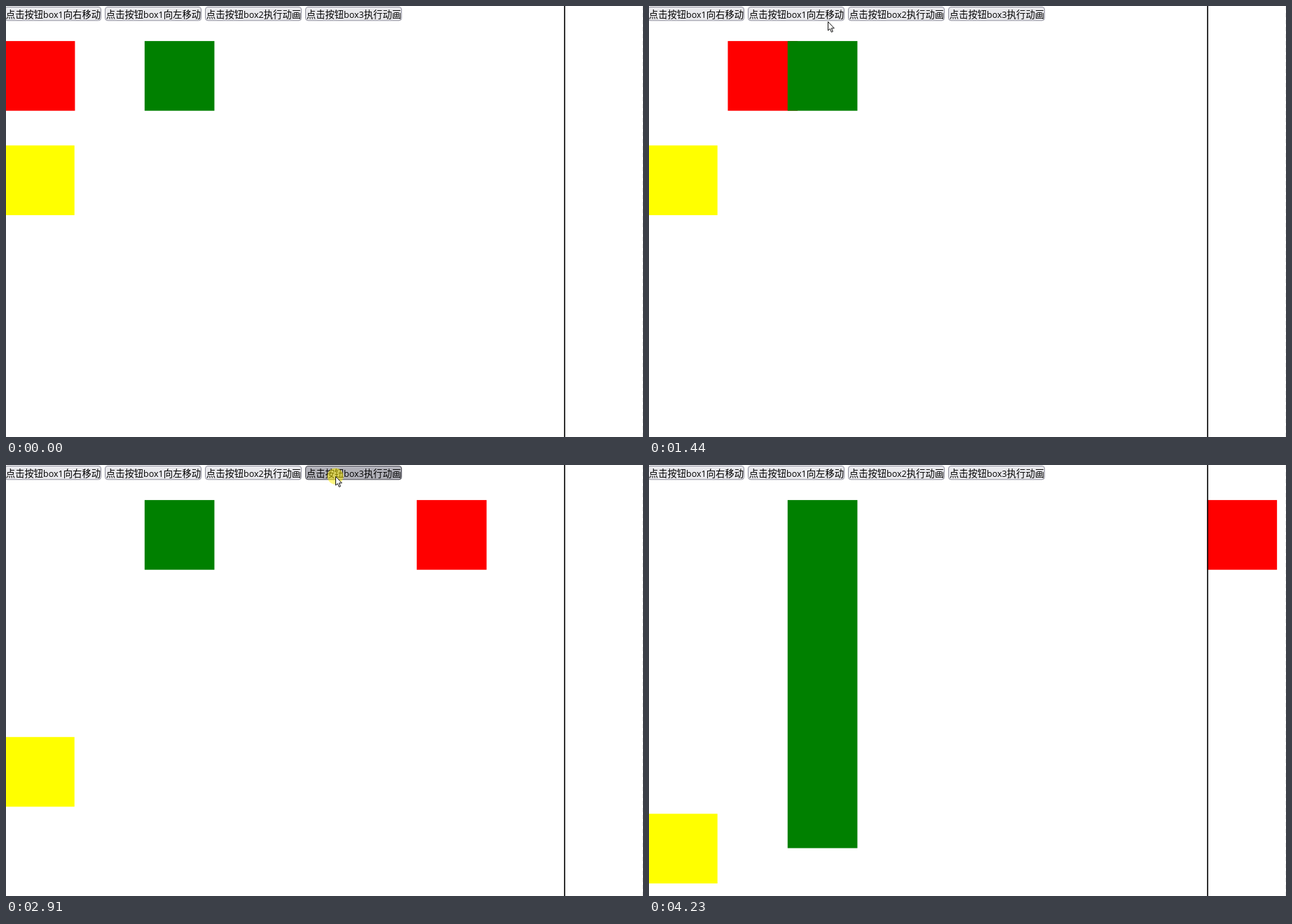
An HTML page with a canvas for the animation above (4.56 s loop, 909 by 616 pixels).

```html
<!DOCTYPE html>
<html lang="zh">
<head>
<meta charset="utf-8">
<title>box animation</title>
<style>
html, body { margin: 0; width: 100%; height: 100%; overflow: hidden; background: #fff; }
canvas { display: block; }
</style>
</head>
<body>
<canvas id="stage" width="909" height="616"></canvas>
<script>
const ctx = document.getElementById('stage').getContext('2d');
const LOOP = 4560, TICK = 69.1, LAST = 61;
const SCALE = 0.9972, SIZE = 99.6;
const STEP = 19, RATE = 1.195; // px per step, steps per tick
const PITCH = 142.9, BUTTON_W = 137;

const CJK = '13.333px "Noto Sans CJK SC", "Noto Sans CJK", sans-serif';
const LATIN = '12.5px "Open Sans", "Noto Sans", sans-serif';
const LABELS = ['box1 向右移动', 'box1 向左移动', 'box2 执行动画', 'box3 执行动画'];
const LOOK = {
  idle: { fill: '#e9e9ed', edge: '#8f8f9d' },
  hover: { fill: '#d0d0d7', edge: '#676774' },
  press: { fill: '#b1b1b9', edge: '#484851' }
};

// where the pointer rests, in ticks; it clicks just before leaving a button
const STOPS = [
  { from: 1, to: 1, x: 543, y: 566 },
  { from: 8, to: 17, x: 115, y: 18, click: true },
  { from: 23, to: 33, x: 325, y: 17, click: true },
  { from: 38, to: 43, x: 470, y: 16, click: true },
  { from: 47, to: 47, x: 504, y: 59 },
  { from: 56, to: 56, x: 676, y: 603 }
];

// constant speed in whole steps, up to the full distance
function travel(k, start, distance) {
  const steps = Math.max(0, Math.floor(RATE * (k - start)));
  return SCALE * Math.min(distance, STEP * steps);
}

function pointer(k) {
  const next = STOPS.findIndex(s => k <= s.to);
  if (k < STOPS[0].from || next < 0) return null;
  const b = STOPS[next];
  if (k >= b.from) return { x: b.x, y: b.y, down: !!b.click && k < b.to && k >= b.to - 2 };
  const a = STOPS[next - 1];
  const f = (k - a.to) / (b.from - a.to);
  const sag = 5.5 * Math.sin(Math.PI * f);
  return {
    x: Math.round(a.x + (b.x - a.x) * f),
    y: Math.round(a.y + (b.y - a.y) * f + sag),
    down: false
  };
}

function box(color, x, y, h = SIZE) {
  ctx.fillStyle = color;
  ctx.fillRect(x, y, SIZE, h);
}

function button(label, i, p) {
  const x = Math.round(-2 + i * PITCH);
  const over = p && p.y < 20 && p.x >= x && p.x <= x + BUTTON_W;
  const look = LOOK[over ? (p.down ? 'press' : 'hover') : 'idle'];
  ctx.beginPath();
  ctx.roundRect(x + 0.5, 1.5, BUTTON_W, 19.3, 3.5);
  ctx.fillStyle = look.fill;
  ctx.fill();
  ctx.strokeStyle = look.edge;
  ctx.lineWidth = 1;
  ctx.stroke();

  const [name, action] = label.split(' ');
  let tx = x + 1.8;
  ctx.fillStyle = '#000';
  for (const [text, font] of [['点击按钮', CJK], [name, LATIN], [action, CJK]]) {
    ctx.font = font;
    ctx.fillText(text, tx, 17);
    tx += ctx.measureText(text).width;
  }
}

function arrow(x, y) {
  ctx.save();
  ctx.translate(x + 0.5, y + 0.5);
  ctx.fillStyle = '#fff';
  ctx.strokeStyle = '#111';
  ctx.lineWidth = 1;
  const shape = new Path2D('M0 0V12.5L2.8 10L4.8 14.8L6.8 14L4.9 9.3H8.8Z');
  ctx.fill(shape);
  ctx.stroke(shape);
  ctx.restore();
}

function rules() {
  ctx.fillStyle = '#000';
  ctx.fillRect(796.4, 0, 1.6, 616);
  ctx.fillStyle = '#ebebeb';
  for (let y = 0; y < 616; y += 10) ctx.fillRect(908, y, 1, 6);
}

function draw(t) {
  const k = Math.min(LAST, Math.floor(t / TICK + 0.25));
  const p = pointer(k);

  ctx.fillStyle = '#fff';
  ctx.fillRect(0, 0, 909, 616);
  LABELS.forEach((label, i) => button(label, i, p));

  box('#f00', -1.2 + travel(k, 15.32, 800), 50.1);
  box('#008000', 197.8, 50.1, SIZE + travel(k, 42.9, 400));
  box('#ff0', -1.9, 199.3 + travel(k, 33.2, 300));
  rules();

  if (!p) return;
  if (p.down) {
    ctx.fillStyle = 'rgba(255, 240, 0, 0.5)';
    ctx.beginPath();
    ctx.arc(p.x, p.y, 11.5, 0, Math.PI * 2);
    ctx.fill();
  }
  arrow(p.x, p.y);
}

const start = performance.now();
function loop() {
  draw((performance.now() - start) % LOOP);
  requestAnimationFrame(loop);
}
loop();
</script>
</body>
</html>
```
